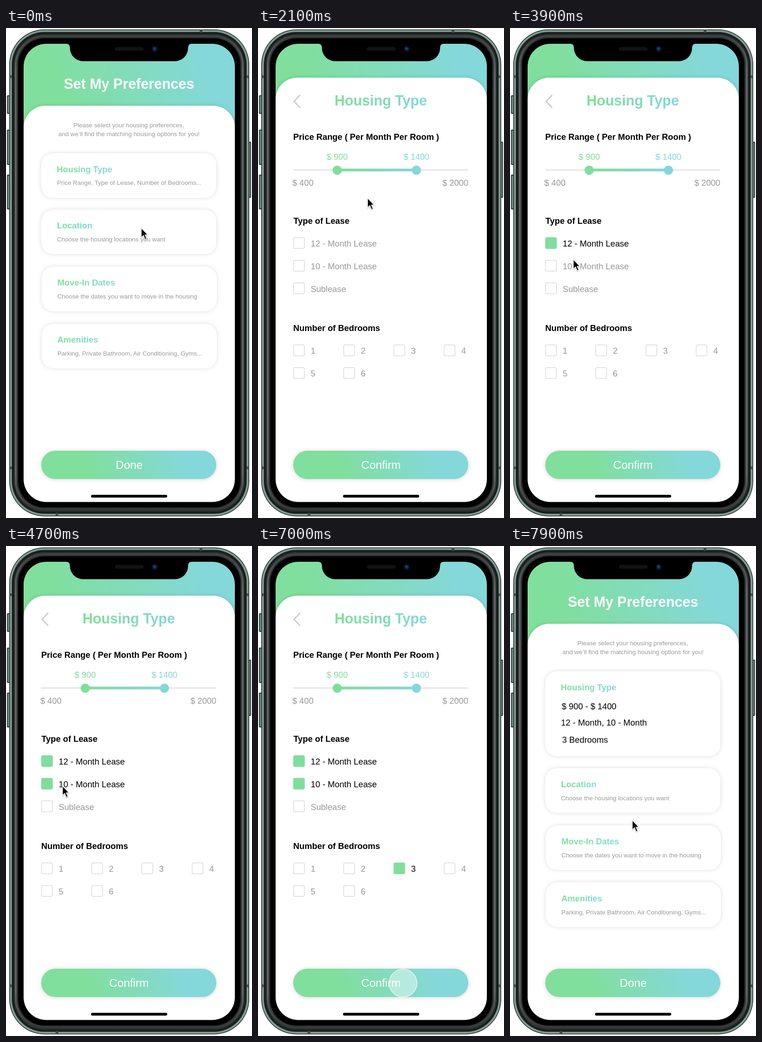
Animation, 531 px wide and 1056 px high, one loop 8000 ms. Source, as an HTML page:

```html
<!DOCTYPE html>
<html lang="en">
<head>
<meta charset="utf-8">
<title>Housing preferences</title>
<style>
html, body { margin: 0; width: 100%; height: 100%; overflow: hidden; background: #fff; }
svg { display: block; width: 531px; height: 1056px; }
text { font-family: "Liberation Sans", Arial, sans-serif; font-size: 18.35px; white-space: pre; }
.big { font-size: 30.5px; font-weight: bold; }
.head { font-weight: bold; }
.small { font-size: 13.45px; fill: #999; }
.btn { font-size: 24.4px; fill: #fff; text-anchor: middle; }
.mid { text-anchor: middle; }
.grad { fill: url(#textGrad); }
.gray { fill: #999; }
.card { fill: #fff; filter: drop-shadow(0 0 5px rgba(0,0,0,.13)); }
.box { fill: #fff; stroke: #dcdcdc; stroke-width: 1.5; }
.on .box { fill: #80de9d; stroke: #80de9d; }
.check text { fill: #999; }
.check.on text { fill: #000; }
#tap circle { fill: rgba(255,255,255,.65); stroke: #fff; stroke-width: 1.6; filter: drop-shadow(0 4px 3px rgba(0,0,0,.3)); }
#tap.soft circle { fill: rgba(255,255,255,.42); stroke: rgba(255,255,255,.75); filter: none; }
#arrow { filter: drop-shadow(0 1px 1px rgba(0,0,0,.35)); }
</style>
</head>
<body>
<svg viewBox="0 0 531 1056" xmlns="http://www.w3.org/2000/svg">
  <defs>
    <linearGradient id="textGrad"><stop offset=".1" stop-color="#80de9d"/><stop offset="1" stop-color="#84d8da"/></linearGradient>
    <linearGradient id="headGrad" gradientUnits="userSpaceOnUse" x1="115" y1="150" x2="425" y2="50">
      <stop stop-color="#80df9c"/><stop offset="1" stop-color="#84d8da"/></linearGradient>
    <linearGradient id="btnGrad" gradientUnits="userSpaceOnUse" x1="180" y1="972" x2="380" y2="911">
      <stop stop-color="#80df9c"/><stop offset="1" stop-color="#84d8da"/></linearGradient>
    <linearGradient id="barGrad" gradientUnits="userSpaceOnUse" x1="171" y1="0" x2="342" y2="0">
      <stop stop-color="#80de9d"/><stop offset="1" stop-color="#84d8da"/></linearGradient>
    <linearGradient id="steel" x1="0" y1="0" x2="0" y2="1">
      <stop stop-color="#3c4040"/><stop offset=".08" stop-color="#626666"/><stop offset=".92" stop-color="#626666"/><stop offset="1" stop-color="#303434"/></linearGradient>
    <clipPath id="screen"><rect x="38" y="34" width="456" height="987.500" rx="49"/></clipPath>
  </defs>

  <g id="device"></g>

  <g clip-path="url(#screen)">
    <rect x="38" y="34" width="456" height="260" fill="url(#headGrad)"/>
    <text id="title" class="big mid" x="265.5" y="130.5" fill="#fff">Set My Preferences</text>
    <path id="sheet" d="M38 47a47 47 0 0 1 47-47H447a47 47 0 0 1 47 47V1000H38Z" fill="#fff" style="filter:drop-shadow(0 0 4px rgba(0,0,0,.14))"/>
    <g id="home">
      <g class="mid">
        <text class="small" x="265" y="214">Please select your housing preferences,</text>
        <text class="small" x="265.5" y="232.5">and we’ll find the matching housing options for you!</text>
      </g>
      <rect id="mainCard" class="card" x="76" y="270" width="378" height="96" rx="25"/>
      <text class="head grad" x="109.5" y="310.5">Housing Type</text>
      <text id="hint" class="small" x="110" y="338">Price Range, Type of Lease, Number of Bedrooms...</text>
      <g id="summary">
        <text x="111.5" y="351.5">$ 900 - $ 1400</text>
        <text x="110" y="387">12 - Month, 10 - Month</text>
        <text x="112.5" y="423.5">3 Bedrooms</text>
      </g>
      <g id="rest"></g>
    </g>
    <g id="type">
      <path d="M91 144L78 158L91 172" fill="none" stroke="#cfcfcf" stroke-width="3"/>
      <text class="big grad mid" x="265" y="167">Housing Type</text>
      <text class="head" x="76" y="240.5">Price Range ( Per Month Per Room )</text>
      <text class="mid" x="171" y="283.5" fill="#80de9d">$ 900</text>
      <text class="mid" x="342" y="283.5" fill="#84d8da">$ 1400</text>
      <path d="M76 306H454" stroke="#dcdcdc" stroke-width="2"/>
      <rect x="171" y="303" width="171" height="6" fill="url(#barGrad)"/>
      <circle cx="171" cy="306.5" r="10" fill="#80de9d"/>
      <circle cx="342" cy="306.5" r="10" fill="#84d8da"/>
      <text class="gray" x="74" y="339.5">$ 400</text>
      <text class="gray" x="454" y="339.5" text-anchor="end">$ 2000</text>
      <text class="head" x="76.5" y="422">Type of Lease</text>
      <text class="head" x="76" y="653">Number of Bedrooms</text>
      <g id="checks"></g>
    </g>
    <rect x="76" y="911" width="378" height="61" rx="30.5" fill="url(#btnGrad)" style="filter:drop-shadow(0 1px 5px rgba(0,0,0,.16))"/>
    <text id="done" class="btn" x="266" y="950">Done</text>
    <text id="confirm" class="btn" x="265.5" y="950">Confirm</text>
    <rect x="183.500" y="1006" width="164.500" height="6" rx="3"/>
  </g>

  <path d="M130 33H401V34Q393 34 393 43A28.500 28.500 0 0 1 364.500 71.500H166.500A28.500 28.500 0 0 1 138 43Q138 34 130 34Z"/>
  <rect x="235" y="41" width="62" height="8" rx="4" fill="#111214"/>
  <circle cx="321" cy="45" r="6.500" fill="#0a1526"/>
  <circle cx="321" cy="45" r="3.500" fill="#14305a"/>
  <circle cx="320" cy="43.500" r="1.300" fill="#3b6396"/>

  <g id="pointer">
    <g id="tap"><circle r="30"/></g>
    <path id="arrow" d="M0 0V20.500L4.700 16.200L8.400 24.500L11.700 23L8.100 15H14.300Z" stroke="#fff" stroke-width="1.300"/>
  </g>
</svg>
<script>
const $ = id => document.getElementById(id);
const rect = (x, y, w, h, r, fill) =>
  `<rect x="${x}" y="${y}" width="${w}" height="${h}" rx="${r}" fill="${fill}"/>`;

// Device body: nested rounded shells [inset, colour], then side buttons and antenna lines
const shells = [[0, '#26332f'], [1.5, '#7f998f'], [3, '#8da89e'], [4.5, '#60776e'], [6, '#151b19'],
  [9, '#262929'], [12, 'url(#steel)'], [15.5, '#3b3e3e'], [18, '#161717'], [20, '#000']];
const buttons = [[2, 145, 40], [2, 219, 76], [2, 316, 75], [522, 245, 121]];
const bands = [[7, 102, 6, 6], [519, 102, 6, 6], [7, 945, 6, 6], [519, 945, 6, 6],
  [418, 3, 6, 7], [107, 1045, 6, 7]];
$('device').innerHTML =
  buttons.map(([x, y, h]) => rect(x, y, 7, h, 2, '#26332f') + rect(x + 1.5, y + 2, 4, h - 4, 1, '#70877e')).join('') +
  shells.map(([d, c]) => rect(7 + d, 3 + d, 518 - 2 * d, 1049.5 - 2 * d, 76 - d, c)).join('') +
  bands.map(([x, y, w, h]) => rect(x, y, w, h, 0, '#3f504a')).join('');

$('rest').innerHTML = [
  [76, 391.5, 'Location', 'Choose the housing locations you want'],
  [77, 514.5, 'Move-In Dates', 'Choose the dates you want to move in the housing'],
  [77, 637.5, 'Amenities', 'Parking, Private Bathroom, Air Conditioning, Gyms...']
].map(([x, y, name, note]) => `<rect class="card" x="${x}" y="${y}" width="378" height="96" rx="25"/>
  <text class="head grad" x="${x + 34}" y="${y + 40.5}">${name}</text>
  <text class="small" x="${x + 34}" y="${y + 68.5}">${note}</text>`).join('');

// Options: x, y, label, time at which it is ticked
const options = [
  [76.7, 451.7, '12 - Month Lease', 2900], [76.7, 500.5, '10 - Month Lease', 4300], [76.7, 549.3, 'Sublease'],
  [76.7, 683, '1'], [185, 683, '2'], [293.3, 683, '3', 5500], [401.7, 683, '4'],
  [76.7, 731.8, '5'], [185, 731.8, '6']
];
$('checks').innerHTML = options.map(([x, y, label]) =>
  `<g class="check"><rect class="box" x="${x}" y="${y}" width="23.500" height="23.500" rx="3"/>
  <text x="${x + 37}" y="${y + 19.2}">${label}</text></g>`).join('');
const checks = [...$('checks').children];

const path = [
  [0, 292, 431], [700, 262, 332], [1800, 262, 332], [2700, 164, 465], [3600, 164, 465],
  [4100, 122, 517], [4700, 122, 517], [5400, 320, 697], [6100, 320, 697], [6900, 313, 942],
  [7300, 313, 942], [7600, 290, 895], [7700, 290, 895], [7900, 264, 591], [8000, 264, 591]
];
// Presses: start, end, soft look
const presses = [[1300, 1700, true], [2900, 3200], [4300, 4600], [5500, 5700], [7000, 7200, true]];

const clamp = v => Math.min(1, Math.max(0, v));
const easeInOut = v => v * v * (3 - 2 * v);
const easeOut = v => 1 - (1 - v) ** 2;
const ramp = (t, start) => easeOut(clamp((t - start) / 200));
const fade = (id, v) => $(id).setAttribute('opacity', v);

function pointerAt(t) {
  const i = path.findIndex(k => k[0] > t);
  const [t0, x0, y0] = path[i - 1], [t1, x1, y1] = path[i];
  const e = easeInOut((t - t0) / (t1 - t0));
  return [x0 + (x1 - x0) * e, y0 + (y1 - y0) * e];
}

function draw(t) {
  const open = ramp(t, 1500) - ramp(t, 7000);
  const filled = t >= 7000;
  $('sheet').setAttribute('transform', `translate(0 ${167.5 - 60.5 * open})`);
  for (const id of ['title', 'home', 'done']) fade(id, 1 - open);
  for (const id of ['type', 'confirm']) fade(id, open);

  $('mainCard').setAttribute('height', filled ? 183 : 96);
  fade('hint', filled ? 0 : 1);
  fade('summary', filled ? 1 : 0);
  $('rest').setAttribute('transform', `translate(0 ${filled ? 87.5 : 0})`);
  options.forEach((o, i) => checks[i].classList.toggle('on', t >= o[3]));

  const press = presses.find(([a, b]) => t >= a && t < b);
  $('pointer').setAttribute('transform', `translate(${pointerAt(t)})`);
  $('tap').setAttribute('class', press && press[2] ? 'soft' : '');
  fade('tap', press ? 1 : 0);
  fade('arrow', press ? 0 : 1);
}

function tick() {
  draw(Math.floor(performance.now() % 8000 / 100) * 100);
  requestAnimationFrame(tick);
}
tick();
</script>
</body>
</html>
```
